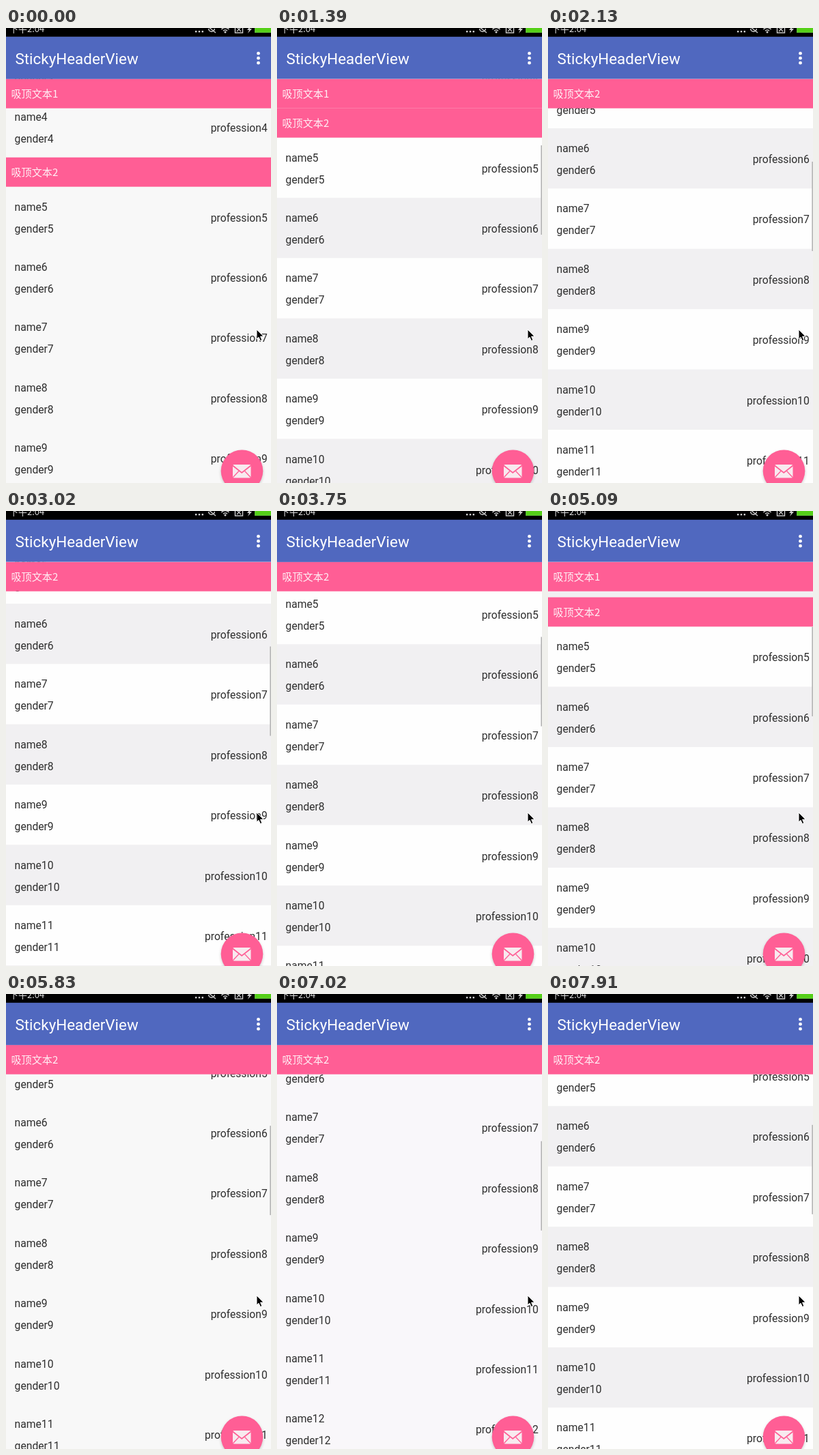
Recreate the animation shown at these times as an HTML page with a canvas. Size 388 px wide and 667 px high, loop 8000 ms.

```html
<!DOCTYPE html>
<html lang="zh">
<head>
<meta charset="utf-8">
<title>StickyHeaderView</title>
<style>
  html, body { margin: 0; width: 100%; height: 100%; overflow: hidden; background: #f8f8f8; }
  canvas { display: block; width: 388px; height: 667px; }
</style>
</head>
<body>
<canvas id="stage"></canvas>
<script>
const W = 388, H = 667, LOOP = 8000;
const STATUS_H = 12.6, BAR_BOTTOM = 74.7, HEADER_H = 43, ROW_H = 88.4;
const HOLD = 500, STEP = 148.2;
const PINK = '#ff5e95', INK = '#2e2e2e';
const LATIN = 'Roboto, sans-serif';
const CJK = '"Noto Sans CJK SC", "Noto Sans CJK", "Noto Sans CJK JP", sans-serif';

// [step, height of the fifth name on screen]
const SCROLL = [
  [-1, 262], [6, 190], [7, 190], [8, 146], [14, 62], [17, 77],
  [27, 226.6], [28, 229], [36, 100], [43, 1], [44, 4], [50, 105.5]
];

const canvas = document.getElementById('stage');
const ctx = canvas.getContext('2d');
const ratio = window.devicePixelRatio || 1;
canvas.width = W * ratio;
canvas.height = H * ratio;

function rect(x, y, w, h, color) {
  ctx.fillStyle = color;
  ctx.fillRect(x, y, w, h);
}

function disc(x, y, r, color) {
  ctx.fillStyle = color;
  ctx.beginPath();
  ctx.arc(x, y, r, 0, Math.PI * 2);
  ctx.fill();
}

function label(text, x, y, font, color, align = 'left') {
  ctx.font = font;
  ctx.textAlign = align;
  ctx.fillStyle = color;
  ctx.fillText(text, x, y);
}

function path(points, close) {
  ctx.beginPath();
  points.forEach(([x, y]) => ctx.lineTo(x, y));
  if (close) ctx.closePath();
}

function fill(color) {
  ctx.fillStyle = color;
  ctx.fill();
}

function stroke(color, width) {
  ctx.strokeStyle = color;
  ctx.lineWidth = width;
  ctx.stroke();
}

function line(points, color, width) {
  path(points);
  stroke(color, width);
}

const secant = i => (SCROLL[i + 1][1] - SCROLL[i][1]) / (SCROLL[i + 1][0] - SCROLL[i][0]);

// Harmonic mean of neighbouring slopes, so the curve never overshoots.
function slope(i) {
  if (i === 0 || i === SCROLL.length - 1) return secant(i ? i - 1 : 0);
  const a = secant(i - 1), b = secant(i);
  return a * b > 0 ? 2 * a * b / (a + b) : 0;
}

function scrollAt(step) {
  let i = 0;
  while (i < SCROLL.length - 2 && step >= SCROLL[i + 1][0]) i++;
  const [x0, y0] = SCROLL[i], [x1, y1] = SCROLL[i + 1];
  const d = x1 - x0, u = (step - x0) / d, v = 1 - u;
  return y0 * v * v * (1 + 2 * u) + y1 * u * u * (3 - 2 * u)
    + d * u * v * (slope(i) * v - slope(i + 1) * u);
}

function drawRow(n, top, striped) {
  const font = `15.7px ${LATIN}`;
  if (striped) rect(0, top, W, ROW_H, n % 2 ? '#fefefe' : '#f1f0f2');
  label('name' + n, 12.6, top + 35, font, INK);
  label('gender' + n, 12.6, top + 67, font, INK);
  label('profession' + n, 382.7, top + 51, font, INK, 'right');
}

function drawHeader(n, top) {
  rect(0, top, W, HEADER_H, PINK);
  label('吸顶文本' + n, 7.5, top + 27.5, `500 15.1px ${CJK}`, '#fff0f5');
}

function drawList(step) {
  const s = scrollAt(step);
  const second = s - 72.3;
  const striped = step >= 0 && (step < 32 || step > 47);
  ctx.save();
  ctx.beginPath();
  ctx.rect(0, BAR_BOTTOM, W, H - BAR_BOTTOM);
  ctx.clip();
  rect(0, BAR_BOTTOM, W, H, step > 40 ? '#f9f7fa' : '#f8f8f8');
  for (let n = 1; n < 16; n++) {
    const top = (n < 5 ? second : s - 29.5) + (n - 5) * ROW_H;
    if (top < H && top + ROW_H > BAR_BOTTOM) drawRow(n, top, striped);
  }
  if (step >= 0) rect(386.3, 172 + (190 - s) * 0.235, 1.7, 131, '#b8b8b8');
  drawHeader(1, Math.min(BAR_BOTTOM, second - HEADER_H));
  drawHeader(2, Math.max(BAR_BOTTOM, second));
  ctx.restore();
}

function drawStatus() {
  const tone = '#d0d0d0';
  rect(0, 0, W, STATUS_H, '#000');
  label('下午2:04', 5, 6, `500 13px ${CJK}`, '#ddd');
  for (let i = 0; i < 3; i++) rect(277 + i * 4.8, 4, 2.4, 2.4, tone);
  ctx.beginPath();
  ctx.arc(301, 1, 4.3, 0, Math.PI);
  stroke(tone, 1.5);
  line([[296, -2], [307, 7]], tone, 1.3);
  for (const r of [4, 7.5]) {
    ctx.beginPath();
    ctx.arc(321, 7, r, -2.4, -0.74);
    stroke(tone, 1.4);
  }
  disc(321, 6, 1.5, tone);
  ctx.strokeRect(335.5, -4, 11, 11);
  line([[338, -1], [344, 5]], tone, 1.2);
  line([[344, -1], [338, 5]], tone, 1.2);
  path([[357, -2], [353, 3], [356, 3], [354, 8], [360, 1], [357, 1]], true);
  fill(tone);
  rect(364, -2, 24, 9, '#5cbf35');
  rect(365.2, -2, 22.8, 7.8, '#55d018');
}

function drawBar() {
  rect(0, STATUS_H, W, BAR_BOTTOM - STATUS_H, '#5068bf');
  label('StickyHeaderView', 13.5, 52.5, `22.4px ${LATIN}`, '#fff');
  for (const y of [37.2, 44.2, 51.2]) disc(369.5, y, 2.4, '#fff');
}

function drawMail() {
  ctx.save();
  ctx.shadowColor = 'rgba(0,0,0,.2)';
  ctx.shadowBlur = 4 * ratio;
  ctx.shadowOffsetY = 2 * ratio;
  disc(345.5, 649.3, 30.8, PINK);
  ctx.restore();
  ctx.beginPath();
  ctx.roundRect(332, 640, 26.5, 19.5, 2);
  fill('#f8eaef');
  line([[332, 641.5], [345.2, 652], [358.5, 641.5]], PINK, 1.7);
  line([[332.5, 658.5], [341, 649.5]], PINK, 1.3);
  line([[358, 658.5], [349.5, 649.5]], PINK, 1.3);
}

function drawPointer() {
  path([[367, 442], [367, 456], [370, 453.2], [372.4, 458.5],
    [374.8, 457.4], [372.5, 452.3], [377, 452]], true);
  fill('#000');
  stroke('#fff', 1);
}

function draw(now) {
  const t = now % LOOP;
  const step = Math.max(-1, Math.floor((t - HOLD + 8) / STEP));
  ctx.setTransform(ratio, 0, 0, ratio, 0, 0);
  drawBar();
  drawStatus();
  drawList(step);
  drawMail();
  drawPointer();
}

const start = performance.now();
function tick() {
  draw(performance.now() - start);
  requestAnimationFrame(tick);
}
tick();
</script>
</body>
</html>
```
